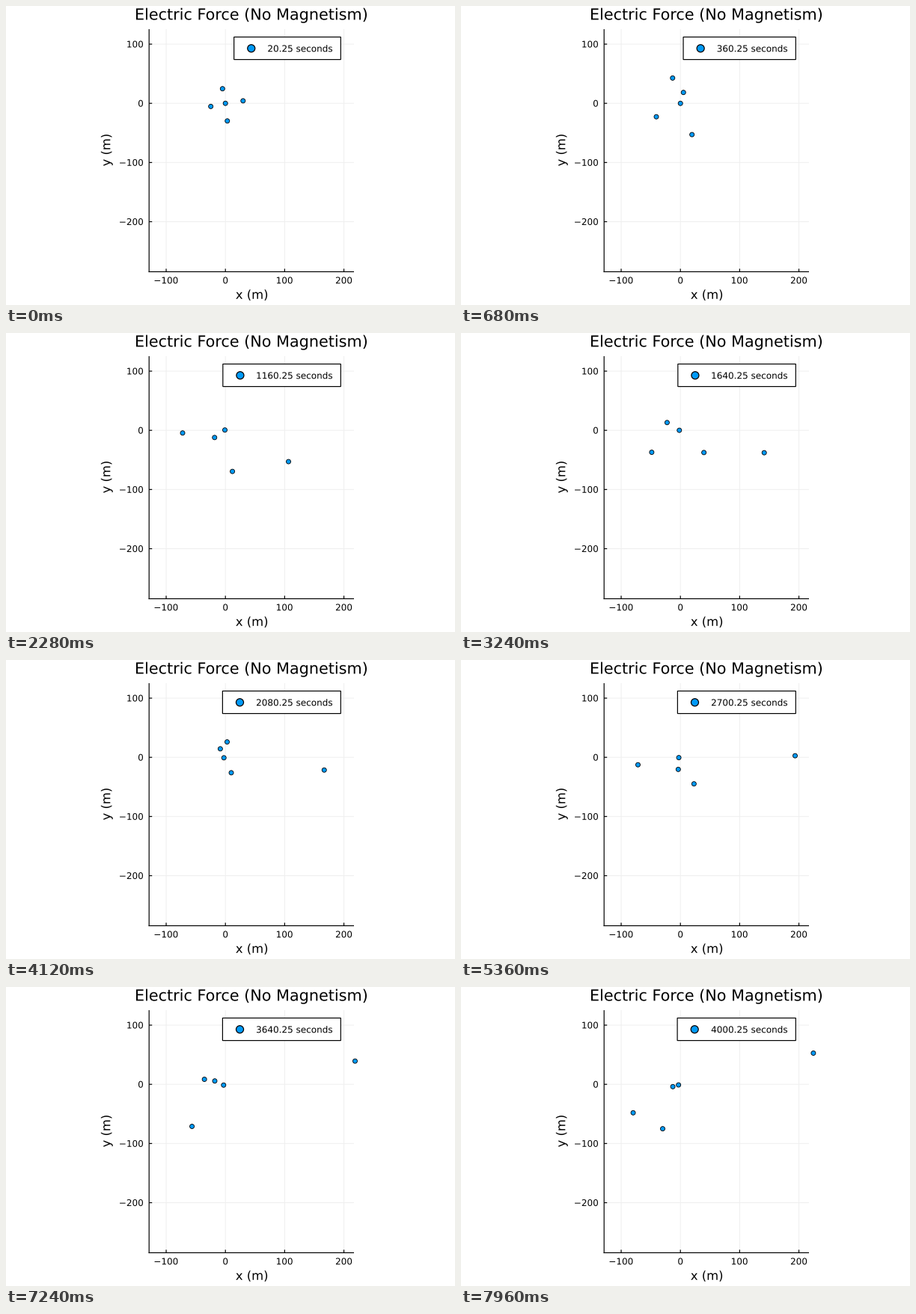
Animation of 600 by 400 pixels, one loop 8 s. Source, as a matplotlib script:

```python
from itertools import permutations

import numpy as np
import matplotlib.pyplot as plt
from matplotlib.animation import FuncAnimation
from matplotlib.patches import Circle, PathPatch, Rectangle
from matplotlib.textpath import TextPath
from matplotlib.transforms import Affine2D

W, H, FRAMES, TICK = 600, 400, 200, 40
OX, OY, SCALE = 293.2, 130.2, 0.7917          # pixel of (0, 0), pixels per metre
LEFT, RIGHT, TOP, BOTTOM = 191.2, 465, 31, 355.5
BLUE, GRID = "#009af9", "#efefef"

# ---- motion: one heavy charge and four light ones in orbit ----
START = np.array([0, 30, 25j, -25, -30j])
# four launch speeds, coupling, centre charge, centre mass, integration lag
GUESS = np.array([.23, .25, .29, .18, .138, 10, 100, .1])
SPREAD = np.array([.015, .015, .015, .015, .003, .2, 5, .12])
DIM, SUB, DT = len(GUESS), 5, 4.0

# places in metres that the light charges pass, in any order, by frame
KEYS = {
    34: [-55.2 + 35.1j, -23.6 - 60.6j, 13.4 - 19.7j, 64.5 - 62.3j],
    81: [-25.5 + 5.1j, -47 - 36j, 40.9 - 35.5j, 143.4 - 42.4j],
    103: [-8.6 + 15.4j, 1.6 + 26.8j, 14.7 - 16.8j, 167.5 - 27.3j],
    134: [-74.8 - 20.6j, 6.4 - 13.3j, 20.6 - 43.8j, 191.5 - 3.9j],
    199: [-73.6 - 52.5j, -12.4 - 8.8j, -38.4 - 90.2j, 211.9 + 44.5j],
}
ORDERS = {f: np.array(list(permutations(pts))) for f, pts in KEYS.items()}


def fly(u, count):
    """Positions (frame, variant, body) for scaled parameters u."""
    va, vb, vc, vd, k, big, heavy, lag = (GUESS + SPREAD * u).T
    m = len(u)
    z = np.zeros((m, 5), complex) + START
    v = np.stack([0j * va, 1j * va, -vb, -1j * vc, vd], axis=1)
    charge, mass = -np.ones((m, 5)), np.ones((m, 5))
    charge[:, 0], mass[:, 0] = big, heavy
    pull = (-k[:, None, None] * charge[:, :, None] * charge[:, None, :]
            / mass[:, :, None])
    eye = np.eye(5)

    def accel():
        d = z[:, None, :] - z[:, :, None]
        s = d.real ** 2 + d.imag ** 2 + eye
        return (pull * d / (s * np.sqrt(s))).sum(axis=2)

    z += v * 0.25
    a = accel()
    v = v + a * DT / 2
    keep = 1 - lag[:, None] / DT
    track = []
    for _ in range(count):
        for _ in range(SUB):
            z += v * DT
            old, a = a, accel()
            v += DT * (keep * a + (1 - keep) * old)
        track.append(z.copy())
    return np.array(track)


def residuals(u, count):
    """Misses at the key places, plus the distance from the guess."""
    runs, variants = u.shape[:2]
    track = fly(u.reshape(-1, DIM), count).reshape(count, runs, variants, 5)
    out = [u]
    for f, orders in ORDERS.items():
        if f < count:
            z = track[f, :, :, 1:]
            miss = (abs(z[:, 0, None] - orders) ** 2).sum(axis=-1)
            gap = z - orders[miss.argmin(axis=-1)][:, None]
            out += [gap.real / 0.5, gap.imag / 0.5]
    r = np.nan_to_num(np.concatenate(out, axis=-1), nan=1e3)
    return np.clip(r, -1e3, 1e3)


def solve_orbits(runs=12, rounds=10, eps=1e-3):
    """Shooting method: damped least squares, one key frame further each time."""
    rng = np.random.default_rng(4)
    base = rng.normal(size=(runs, DIM)) * 0.7
    base[0] = 0
    probes = eps * np.vstack([np.zeros(DIM), np.eye(DIM)])
    for f in KEYS:
        step = np.zeros_like(base)
        damp = np.full(runs, 0.1)
        cost = np.full(runs, np.inf)
        jac = res = None
        for _ in range(rounds):
            trial = base + step
            r = residuals(trial[:, None] + probes, f + 1)
            new = (r[:, 0] ** 2).sum(axis=-1)
            slope = (r[:, 1:] - r[:, :1]) / eps
            if jac is None:
                jac, res = slope.copy(), r[:, 0].copy()
            good = new < cost
            base[good], cost[good] = trial[good], new[good]
            jac[good], res[good] = slope[good], r[good, 0]
            damp = np.where(good, damp * 0.2, damp * 6)
            hess = jac @ jac.transpose(0, 2, 1)
            diag = np.einsum("rii->ri", hess) + 1e-3
            hess = hess + np.eye(DIM) * (damp[:, None] * diag)[:, None, :]
            grad = jac @ res[..., None]
            step = np.clip(-np.linalg.solve(hess, grad)[..., 0], -1.5, 1.5)
        base = base[cost.argsort()]
        best = base[0].copy()
        half = runs // 2
        base[half:] = base[:runs - half] + 0.05 * rng.normal(size=(runs - half, DIM))
    return best


path = fly(solve_orbits()[None], FRAMES)[:, 0]
PX, PY = OX + SCALE * path.real, OY - SCALE * path.imag

# ---- drawing, in pixels with y downwards ----
fig = plt.figure(figsize=(W / 100, H / 100), dpi=100, facecolor="white")
ax = fig.add_axes([0, 0, 1, 1])
ax.set_xlim(0, W)
ax.set_ylim(H, 0)
ax.axis("off")


def glyphs(text, size, x, y, align="mid", turn=0):
    """Text outline with its ink aligned at x and its baseline at y."""
    shape = TextPath((0, 0), text, size=size)
    box = shape.get_extents()
    dx = -box.x1 if align == "right" else -(box.x0 + box.x1) / 2
    place = Affine2D().translate(dx, 0).rotate_deg(turn).scale(1, -1).translate(x, y)
    return place.transform_path(shape)


def write(*args, **kw):
    return ax.add_patch(PathPatch(glyphs(*args, **kw), fc="black", lw=0, zorder=6))


def line(x0, y0, x1, y1, color="black", width=1.2, z=2):
    ax.plot([x0, x1], [y0, y1], color=color, lw=width * 0.72, zorder=z,
            solid_capstyle="butt", snap=False)


def dot(r, width, z):
    return ax.add_patch(Circle((0, 0), r, fc=BLUE, ec="black", lw=width * 0.72, zorder=z))


def label(value):
    return str(value).replace("-", "\u2212")


for value in range(-100, 201, 100):
    x = OX + SCALE * value
    line(x, TOP, x, BOTTOM, GRID, 1, 1)
    line(x, BOTTOM, x, BOTTOM - 4)
    write(label(value), 12, x, 371.3)
for value in range(-200, 101, 100):
    y = OY - SCALE * value
    line(LEFT, y, RIGHT, y, GRID, 1, 1)
    line(LEFT, y, LEFT + 4, y)
    write(label(value), 12, 183, y + 4.4, align="right")
line(LEFT, TOP, LEFT, BOTTOM + 0.6)
line(LEFT - 0.6, BOTTOM, RIGHT, BOTTOM)

write("Electric Force (No Magnetism)", 20.75, 328, 18.4)
write("x (m)", 16.4, 328.2, 391.8)
write("y (m)", 16.4, 139.3, 193, turn=90)

dots = [dot(3.0, 0.85, 3) for _ in START]
BOX_RIGHT, BOX_TOP, BOX_BOTTOM = 447.3, 41.5, 71.6
frame_box = ax.add_patch(Rectangle((0, BOX_TOP), 1, BOX_BOTTOM - BOX_TOP, fc="white",
                                   ec="black", lw=1.2 * 0.72, zorder=4, snap=False))
key = dot(5.0, 1.25, 5)
clock = write("0", 12, 0, 0)


def update(i):
    for patch, x, y in zip(dots, PX[i], PY[i]):
        patch.center = x, y
    text = glyphs(f"{20 * (i + 1)}.25 seconds", 12, 436, 61.2, align="right")
    clock.set_path(text)
    edge = text.get_extents().x0 - 45.6
    frame_box.set_x(edge)
    frame_box.set_width(BOX_RIGHT - edge)
    key.center = edge + 23.1, 56.7
    return [*dots, frame_box, key, clock]


anim = FuncAnimation(fig, update, frames=FRAMES, interval=TICK, repeat=True,
                     repeat_delay=0, init_func=lambda: update(0), blit=False)
plt.show()
```
